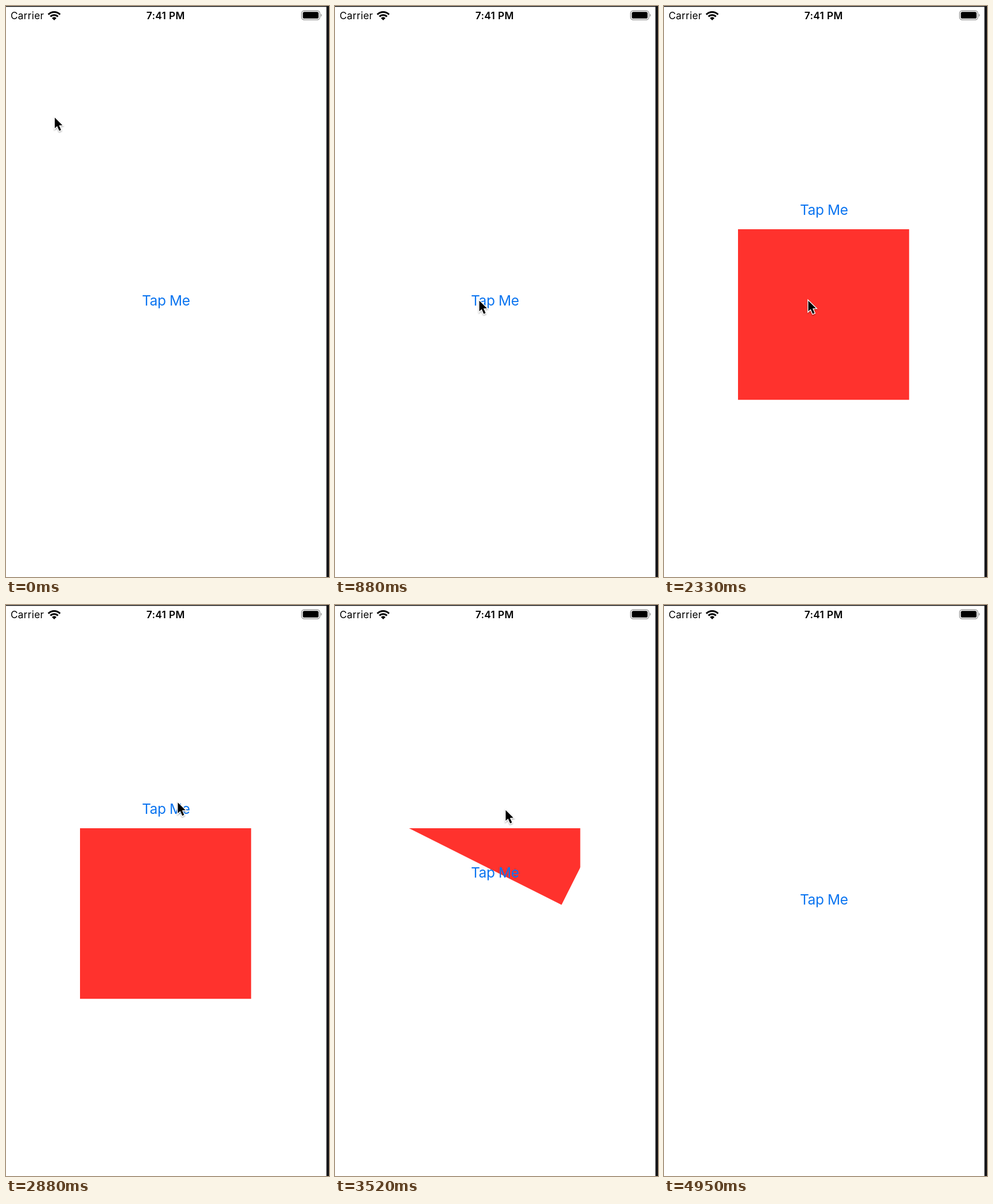
These frames come from a looping animation (563 by 995 pixels, 4.98 s). An HTML page:

```html
<!DOCTYPE html>
<html lang="en">
<head>
<meta charset="utf-8">
<title>Pivot transition</title>
<style>
  html, body { margin: 0; width: 100%; height: 100%; overflow: hidden; background: #fff; }
  svg { display: block; width: 563px; height: 995px; font-family: Inter, Roboto, sans-serif; }
  .status { font-size: 17.3px; }
</style>
</head>
<body>
<svg viewBox="0 0 563 995">
  <defs>
    <clipPath id="frame"><rect x="129" y="389" width="298.5" height="297.5"/></clipPath>
    <filter id="shadow" x="-50%" y="-50%" width="200%" height="200%">
      <feDropShadow dx="0" dy="1.5" stdDeviation="1.3" flood-opacity=".35"/>
    </filter>
  </defs>

  <rect width="563" height="995" fill="#fff"/>
  <rect width="563" height="1.4" fill="#0c0c0e"/>
  <rect x="558.5" width="4.5" height="995" fill="#151518"/>

  <text class="status" x="8" y="23" letter-spacing=".25">Carrier</text>
  <text class="status" x="278.2" y="23" text-anchor="middle" font-weight="600" letter-spacing=".35">7:41 PM</text>

  <g fill="none" stroke="#000" stroke-width="3.1">
    <path d="M73.8 14.8A14.4 14.4 0 0 1 94.2 14.8"/>
    <path d="M77.5 18.5A9.2 9.2 0 0 1 90.5 18.5"/>
    <path d="M84 25L80 21A5.6 5.6 0 0 1 88 21Z" fill="#000" stroke="none"/>
  </g>

  <rect x="515.2" y="8.2" width="31.8" height="15.8" rx="4.5" fill="none" stroke="#9b9b9b" stroke-width="1.4"/>
  <rect x="517.4" y="10.3" width="27.4" height="11.5" rx="2.6"/>
  <path d="M548.7 13.4q1.8 .8 1.8 2.7t-1.8 2.7z" fill="#9b9b9b"/>

  <g id="content">
    <text id="label" x="278.8" y="522.4" text-anchor="middle" font-size="24.5" letter-spacing="-.4" fill="#0a74f0">Tap Me</text>
    <g id="panel" clip-path="url(#frame)">
      <rect id="square" x="129" y="389" width="298.5" height="297.5" fill="#ff322d"/>
    </g>
  </g>

  <path id="cursor" filter="url(#shadow)" d="M0 0V18.6L4.2 14.7L7.8 22.9L11 21.5L7.4 13.5L13.3 13.2Z"
    stroke="#fff" stroke-width="2.6" paint-order="stroke"/>
</svg>

<script>
const LOOP = 4980, DURATION = 350, SHIFT = 158.6;
const SHOW = { press: 1750, release: 1850 };
const HIDE = { press: 3200, release: 3303 };
const CURSOR_GONE = 4000;

const [content, label, panel, square, cursor] =
  ["content", "label", "panel", "square", "cursor"].map(id => document.getElementById(id));

const clamp = v => Math.min(1, Math.max(0, v));
const linear = u => u;
const smooth = u => u * u * (3 - 2 * u);
const easeOut = u => 1 - (1 - u) ** 2;

// cubic-bezier(.42, 0, .58, 1)
function easeInOut(x) {
  let low = 0, high = 1;
  for (let i = 0; i < 20; i++) {
    const s = (low + high) / 2, r = 1 - s;
    if (1.26 * s * r * r + 1.74 * s * s * r + s ** 3 < x) low = s; else high = s;
  }
  return smooth(low);
}

// time, x, y, easing towards this point
const path = [
  [30, 85, 194.5],
  [430, 253, 474, smooth],
  [550, 255, 494.5, linear],
  [760, 251.5, 513.5, easeOut],
  [2380, 251.5, 513.5, linear],
  [2800, 300, 341, smooth],
  [3080, 297.5, 357.5, smooth],
  [3750, 297.5, 357.5, linear],
  [3950, 408, 246, smooth]
];

function cursorAt(t) {
  let [, x, y] = path[0];
  for (let i = 1; i < path.length; i++) {
    const start = path[i - 1][0], [end, nextX, nextY, ease] = path[i];
    const u = ease(clamp((t - start) / (end - start)));
    x += (nextX - x) * u;
    y += (nextY - y) * u;
    if (t < end) break;
  }
  return [x, y];
}

function labelOpacity(t) {
  const tap = t < HIDE.press ? SHOW : HIDE;
  if (t < tap.press) return 1;
  return 0.2 + 0.8 * clamp((t - tap.release) / 200);
}

function render(t) {
  const progress = tap => easeInOut(clamp((t - tap.release) / DURATION));
  const shown = progress(SHOW) - progress(HIDE);

  label.setAttribute("transform", `translate(0 ${-SHIFT * shown})`);
  label.setAttribute("opacity", labelOpacity(t));
  square.setAttribute("transform", `rotate(${-90 * (1 - shown)} 129 389)`);
  panel.style.display = shown > 0.0001 ? "" : "none";
  // A leaving panel drops behind the label.
  content.append(...(t < HIDE.release ? [label, panel] : [panel, label]));

  cursor.setAttribute("transform", `translate(${cursorAt(t)})`);
  cursor.style.display = t < CURSOR_GONE ? "" : "none";
}

const startTime = performance.now();
function tick() {
  render((performance.now() - startTime) % LOOP);
  requestAnimationFrame(tick);
}
tick();
</script>
</body>
</html>
```
